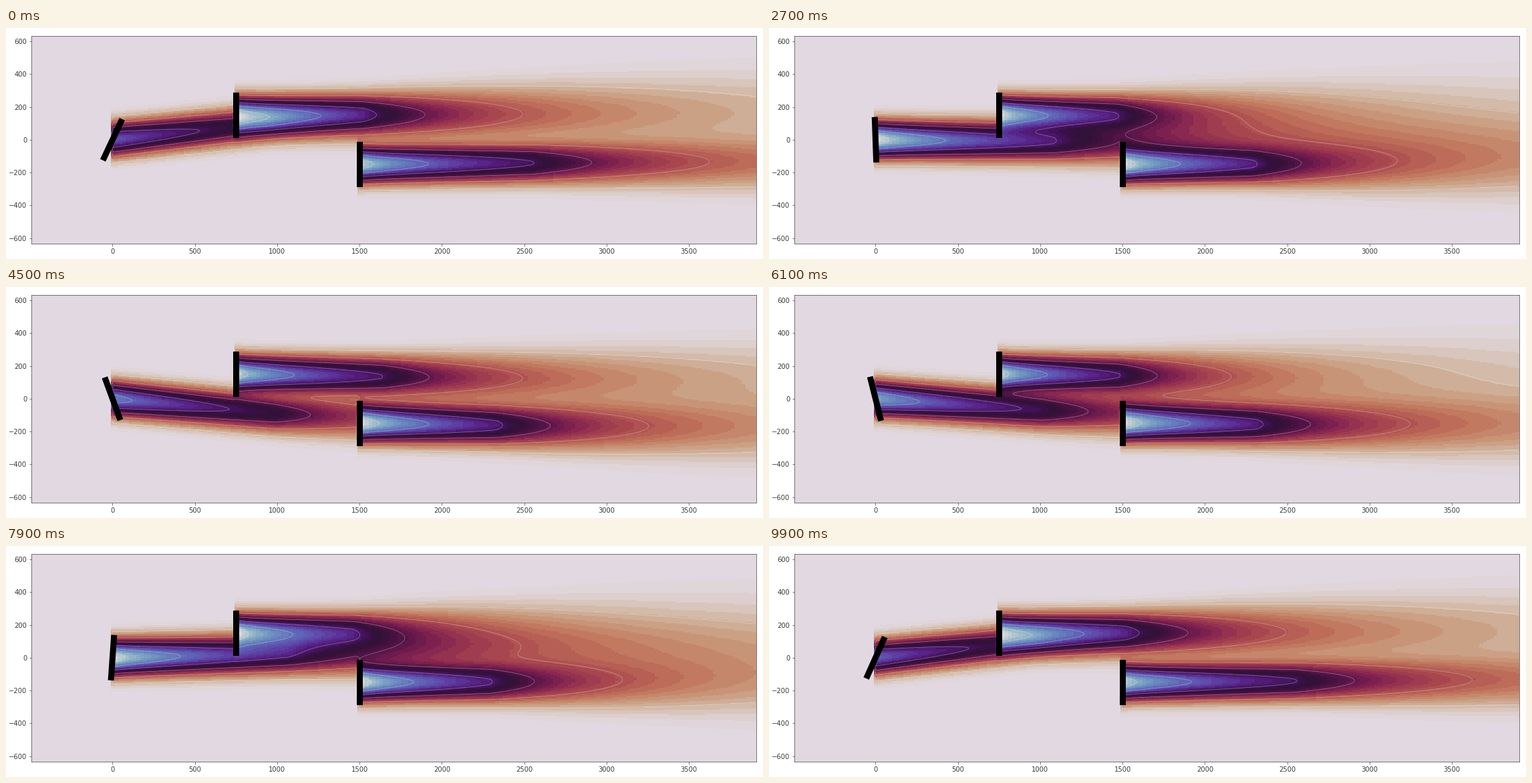
These frames come from a looping animation (1133x347 px, 10000 ms). A matplotlib script:

```python
import numpy as np
import matplotlib.pyplot as plt
from matplotlib.animation import FuncAnimation

W, H, DPI = 1133, 347, 72
FRAMES, INTERVAL = 100, 100
MAX_YAW = 25.0

# Turbines: rotor diameter and hub positions
D = 240
SITES = [(0, 0), (750, 150), (1500, -150)]

# Gaussian wake constants
CT, TI = 0.8, 0.06
ALPHA, BETA = 0.58, 0.077
KA, KB = 0.38, 0.004

# Sample points reach 2 D around the sites and 10 D behind the last one
N = 200
xs = np.linspace(-2 * D, 1500 + 10 * D, N)
ys = np.linspace(-150 - 2 * D, 150 + 2 * D, N)
X, Y = np.meshgrid(xs, ys)
LEVELS = 0.15 * np.arange(1, 7)
SPINE, TEXT = "#555555", "#3a3a3a"


class Wake:
    """Deficit behind one rotor, as a share of the free stream speed."""

    def __init__(self, site, yaw=0.0, ti=TI, steer=0.0):
        self.x, self.y = site
        rad = np.radians(yaw)
        self.cos = np.cos(rad)
        self.ct = CT * self.cos
        root = np.sqrt(1 - self.ct)
        root_yaw = np.sqrt(1 - self.ct * self.cos)
        self.x0 = (D * self.cos * (1 + root_yaw)
                   / (np.sqrt(2) * (4 * ALPHA * ti + 2 * BETA * (1 - root))))
        self.k = KA * ti + KB
        self.sz0 = D * np.sqrt(0.125)
        self.sy0 = self.sz0 * self.cos
        self.c0 = 1 - root
        self.induction = 0.5 / self.cos * (1 - root_yaw)
        # The wake turns harder close to the rotor than far behind it
        turn = 0.3 * rad / self.cos * (1 - root_yaw)
        self.near_angle = steer + turn * (1.9 - 0.007 * abs(yaw))
        self.far_angle = steer + turn

    def sigmas(self, dx):
        ramp = np.clip(dx / self.x0, 0, 1)
        start = 0.501 * D * np.sqrt(self.ct / 2)
        grow = self.k * np.maximum(dx - self.x0, 0)
        return [start * (1 - ramp) + s0 * ramp + grow
                for s0 in (self.sy0, self.sz0)]

    def center(self, dx):
        near = np.tan(self.near_angle) * np.clip(dx, 0, self.x0)
        c0 = self.c0
        m = np.sqrt(c0 * (2 - c0))
        e0 = c0 ** 2 - 3 * np.exp(1 / 12) * c0 + 3 * np.exp(1 / 3)
        grow = self.k * np.maximum(dx - self.x0, 0)
        s = 1.6 * np.sqrt((self.sy0 + grow) * (self.sz0 + grow)
                          / (self.sy0 * self.sz0))
        log = np.log((1.6 + m) * (s - m) / ((1.6 - m) * (s + m)))
        far = (self.far_angle * e0 / 5.2
               * np.sqrt(self.sy0 * self.sz0) / (self.k * m) * log)
        return self.y + near + far

    def deficit(self, x, y, z=0.0):
        dx = x - self.x
        sy, sz = self.sigmas(dx)
        load = self.ct * self.cos * D ** 2 / (8 * sy * sz)
        c = 1 - np.sqrt(np.clip(1 - load, 0, 1))
        r = y - self.center(dx)
        shape = np.exp(-r ** 2 / (2 * sy ** 2) - z ** 2 / (2 * sz ** 2))
        return np.where(dx > 0.1, c * shape, 0)

    def added_ti(self, site):
        """Extra turbulence at a rotor, by the share of it inside the wake."""
        offset = np.array([-40, 0, 40])
        py, pz = np.meshgrid(site[1] + offset, offset)
        share = np.mean(self.deficit(site[0], py, pz) > 0.005)
        dist = (site[0] - self.x) / D
        return share * 0.5 * self.induction ** 0.8 * TI ** 0.1 * dist ** -0.32


def flow(yaw):
    steer = 0.0006 * yaw - 0.000011 * yaw ** 2
    wakes = [Wake(SITES[0], yaw, TI + 0.0007 * abs(yaw))]
    for site in SITES[1:]:
        extra = max(w.added_ti(site) for w in wakes)
        wakes.append(Wake(site, 0.0, np.hypot(TI, extra), steer))
    return 1 - np.sqrt(sum(w.deficit(X, Y) ** 2 for w in wakes))


def rotor_line(site, yaw):
    a = np.radians(yaw)
    reach = np.array([-D / 2, D / 2])
    return site[0] + reach * np.sin(a), site[1] + reach * np.cos(a)


def yaw_at(i):
    half = FRAMES / 2
    return MAX_YAW * (2 * abs(i - half) / half - 1)


plt.rcParams["font.family"] = "DejaVu Sans"
fig = plt.figure(figsize=(W / DPI, H / DPI), dpi=DPI, facecolor="white")
ax = fig.add_axes([38.4 / W, 23.1 / H, 1085 / W, 312.1 / H])

hx, hy = (xs[1] - xs[0]) / 2, (ys[1] - ys[0]) / 2
xlim, ylim = (xs[0] - hx, xs[-1] + hx), (ys[0] - hy, ys[-1] + hy)
image = ax.imshow(
    np.ones((N, N)), origin="lower", aspect="auto", interpolation="nearest",
    extent=(*xlim, *ylim), cmap=plt.get_cmap("twilight").resampled(48))
rotors = [ax.plot(*rotor_line(s, 0), color="k", lw=9, zorder=5)[0]
          for s in SITES]
ax.set_xlim(xlim)
ax.set_ylim(ylim)
ax.set_xticks(range(0, 3501, 500))
ax.set_yticks(range(-600, 601, 200))
ax.tick_params(labelsize=10, color=SPINE, labelcolor=TEXT)
ax.spines[:].set_color(SPINE)

lines = []


def update(i):
    yaw = yaw_at(i)
    u = flow(yaw)
    image.set_data(u)
    image.set_clim(u.min(), 1)
    while lines:
        lines.pop().remove()
    lines.append(ax.contour(X, Y, u, levels=LEVELS, colors="w",
                            linewidths=0.8, alpha=0.35))
    rotors[0].set_data(*rotor_line(SITES[0], yaw))
    return [image, *rotors]


anim = FuncAnimation(fig, update, frames=FRAMES, interval=INTERVAL,
                     init_func=lambda: update(0), repeat=True, repeat_delay=0)
plt.show()
```
